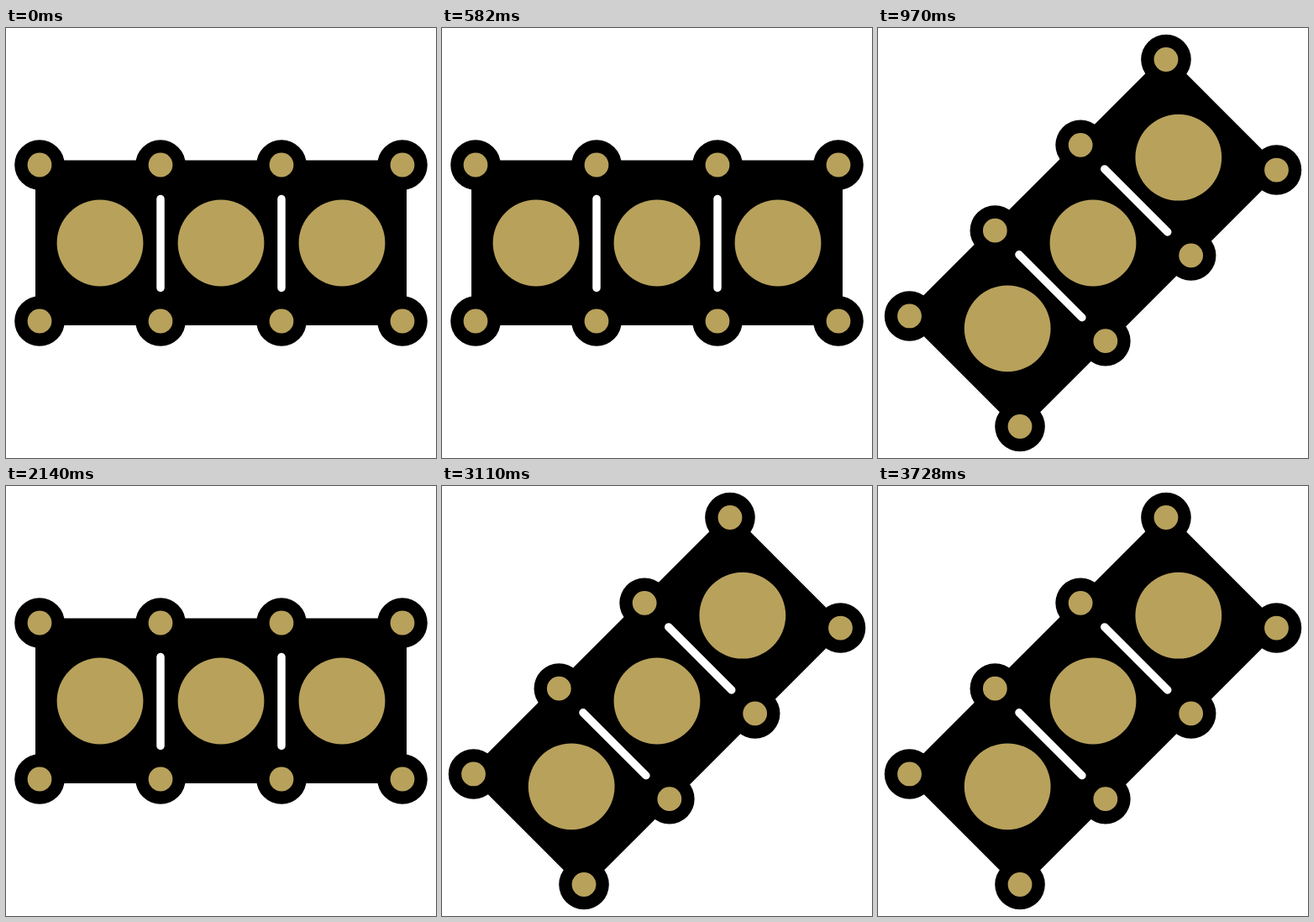
Recreate the animation shown at these times as an HTML page with a canvas. Size 512x512 px, loop 4140 ms.

```html
<!DOCTYPE html>
<html lang="en">
<head>
<meta charset="utf-8">
<title>Turning panel</title>
<style>
html, body { margin: 0; width: 100%; height: 100%; overflow: hidden; background: #fff; }
canvas { display: block; width: 512px; height: 512px; }
</style>
</head>
<body>
<canvas id="stage" width="512" height="512"></canvas>
<script>
const ctx = document.getElementById('stage').getContext('2d');
const GOLD = '#b8a15b';
const LOOP = 4140;
const TURNS = [970, 2140, 3110];
const STEP = 144;

function disc(x, y, r, color) {
  ctx.fillStyle = color;
  ctx.beginPath();
  ctx.arc(x, y, r, 0, Math.PI * 2);
  ctx.fill();
}

function bar(x) {
  ctx.strokeStyle = '#fff';
  ctx.lineWidth = 9.5;
  ctx.lineCap = 'round';
  ctx.beginPath();
  ctx.moveTo(x, -52.5);
  ctx.lineTo(x, 53.5);
  ctx.stroke();
}

// The panel is drawn around the stage centre.
function draw(time) {
  const turns = TURNS.filter(t => time >= t).length;
  ctx.setTransform(1, 0, 0, 1, 0, 0);
  ctx.fillStyle = '#fff';
  ctx.fillRect(0, 0, 512, 512);
  ctx.translate(256, 256);
  if (turns % 2) ctx.rotate(-Math.PI / 4);

  ctx.fillStyle = '#000';
  ctx.fillRect(-221, -98.5, 442, 196.5);
  for (let i = 0; i < 4; i++) {
    const x = (i - 1.5) * STEP;
    for (const y of [-93, 93]) {
      disc(x, y, 29.8, '#000');
      disc(x, y, 14.4, GOLD);
    }
  }
  for (const i of [-1, 0, 1]) disc(i * STEP, 0, 51.4, GOLD);
  bar(-STEP / 2);
  bar(STEP / 2);
}

const start = performance.now();
function tick() {
  draw((performance.now() - start) % LOOP);
  requestAnimationFrame(tick);
}
tick();
</script>
</body>
</html>
```
